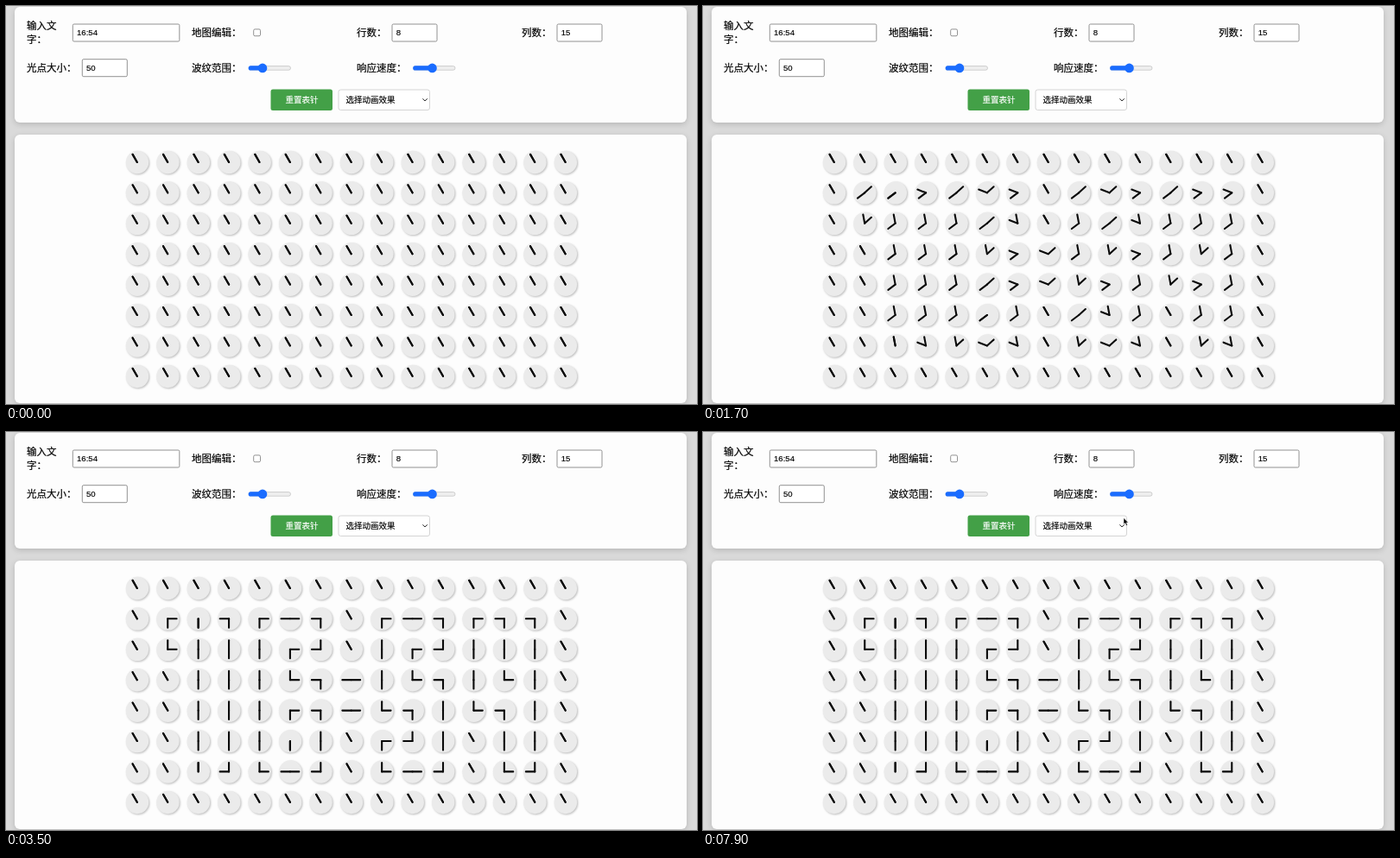
Write an HTML page that moves like this. It is 800 px wide and 461 px high and loops after 8 s.

```html
<!DOCTYPE html>
<html lang="zh-CN">
<head>
<meta charset="utf-8">
<title>表针文字</title>
<style>
html, body { margin: 0; width: 100%; height: 100%; overflow: hidden; background: #dadada; }
svg { display: block; width: 800px; height: 461px; }
text { font-family: "Noto Sans CJK SC", "Noto Sans CJK", sans-serif; font-weight: 500; fill: #000; }
.label { font-size: 11.5px; stroke: #000; stroke-width: .2; }
.small { font-size: 9.5px; stroke: #000; stroke-width: .15; }
.value { font: 9.6px "Liberation Sans", sans-serif; stroke: #000; stroke-width: .15; }
.on-button { fill: #fff; stroke: #fff; }
.panel { fill: #fdfdfd; filter: drop-shadow(0 2px 3px rgba(0, 0, 0, .16)); }
.box { fill: #fff; stroke: #767676; stroke-width: .8; }
#faces { fill: #ebebeb; filter: drop-shadow(1px 1px 1.2px rgba(0, 0, 0, .26)); }
#hands { stroke: #0a0a0a; stroke-width: 2.1; stroke-linecap: round; }
</style>
</head>
<body>
<svg viewBox="0 0 800 461">
  <rect class="panel" x="10" y="1" width="778" height="134" rx="6"/>
  <rect class="panel" x="10" y="149" width="778" height="311" rx="6"/>

  <text class="label" x="24" y="27">输入文</text>
  <text class="label" x="24" y="43">字：</text>
  <text class="label" x="215" y="35">地图编辑：</text>
  <text class="label" x="406" y="35">行数：</text>
  <text class="label" x="597" y="35">列数：</text>
  <text class="label" x="24" y="76">光点大小：</text>
  <text class="label" x="215" y="76">波纹范围：</text>
  <text class="label" x="406" y="76">响应速度：</text>

  <g id="fields"></g>
  <rect class="box" x="286.7" y="26.9" width="7.8" height="7.8" rx="1.5"/>
  <g id="sliders"></g>

  <rect x="306.5" y="96.5" width="71.5" height="24.5" rx="2.5" fill="#43a047"/>
  <text class="small on-button" x="323.5" y="112.2">重置表针</text>
  <rect x="385" y="97" width="105.5" height="23.5" rx="2.5" fill="#fff" stroke="#d4d4d4"/>
  <text class="small" x="393.5" y="112.2">选择动画效果</text>
  <path d="M482.5 107.3l2.6 2.7 2.6-2.7" fill="none" stroke="#222" stroke-width="1"/>

  <g id="faces"></g>
  <g id="hands"></g>
  <path id="cursor" d="M0 0v7.4l1.7-1.5 1.3 3 1.4-.6-1.3-2.9h2.3z" stroke="#fff" stroke-width=".5"/>
</svg>
<script>
const LOOP = 8000, STEP = 100, REST = -30;
const TURN_START = 940, TURN_TIME = 1310;
const COLS = 15, ROWS = 8, PITCH = 35.42;
const GLYPHS = [
  "",
  " ┌╷┐┌─┐ ┌─┐┌┐┐",
  " └│││┌┘ │┌┘│││",
  "  │││└┐─│└┐│└│",
  "  │││┌┐─└┐│└┐│",
  "  │││╷│ ┌┘│ ││",
  "  ╵┘└─┘ └─┘ └┘",
  ""
];
// Clockwise degrees from twelve o'clock, chosen within half a turn of REST
const UP = 0, RIGHT = 90, DOWN = -180, LEFT = -90;
const ANGLES = {
  "┌": [RIGHT, DOWN], "┐": [LEFT, DOWN], "└": [RIGHT, UP], "┘": [LEFT, UP],
  "─": [LEFT, RIGHT], "│": [UP, DOWN], "╷": [DOWN, DOWN], "╵": [UP, UP]
};
// Pointer tip: time, x, y
const POINTER = [[5000, 494, -9], [6100, 487.5, 88], [6500, 487.5, 88], [7500, 487, 99.5], [8000, 487, 99.5]];

const $ = id => document.getElementById(id);
function add(parent, tag, attrs, text) {
  const el = document.createElementNS("http://www.w3.org/2000/svg", tag);
  for (const k in attrs) el.setAttribute(k, attrs[k]);
  if (text) el.textContent = text;
  return parent.appendChild(el);
}

function addField(x, y, width, value) {
  add($("fields"), "rect", { class: "box", x, y, width, height: 20, rx: 1.5 });
  add($("fields"), "text", { class: "value", x: x + 4.7, y: y + 13.4 }, value);
}
addField(77.3, 21, 123.5, "16:54");
addField(447, 21, 52, "8");
addField(638, 21, 52, "15");
addField(88.3, 61.7, 52, "50");

function addSlider(x, thumb) {
  const g = $("sliders");
  add(g, "rect", { x, y: 69.6, width: 48.5, height: 4.6, rx: 2.3, fill: "#efefef", stroke: "#bdbdbd", "stroke-width": .7 });
  add(g, "rect", { x: x - .3, y: 69.3, width: thumb - x, height: 5.2, rx: 2.6, fill: "#1a6cff" });
  add(g, "circle", { cx: thumb, cy: 71.9, r: 5.3, fill: "#1a6cff" });
}
addSlider(281, 297);
addSlider(471.5, 493.5);

const moving = [];
for (let r = 0; r < ROWS; r++) {
  for (let c = 0; c < COLS; c++) {
    const x = 152 + c * PITCH, y = 181 + r * PITCH;
    add($("faces"), "circle", { cx: x, cy: y, r: 13.2 });
    for (const to of ANGLES[GLYPHS[r][c]] || [REST, REST]) {
      const el = add($("hands"), "line", { y2: -10.4 });
      const hand = { el, x: x - .2, y: y - .1, to };
      turn(hand, 0);
      if (to !== REST) moving.push(hand);
    }
  }
}

function turn({ el, x, y, to }, p) {
  el.setAttribute("transform", `translate(${x} ${y}) rotate(${REST + (to - REST) * p})`);
}

const clamp = v => Math.min(1, Math.max(0, v));
const easeInOut = v => v < .5 ? 2 * v * v : 1 - 2 * (1 - v) ** 2;
const easeOut = v => 1 - (1 - v) ** 2;

function placePointer(t) {
  const next = POINTER.findIndex(k => k[0] > t);
  $("cursor").style.display = next > 0 ? "" : "none";
  if (next < 1) return;
  const [t0, x0, y0] = POINTER[next - 1], [t1, x1, y1] = POINTER[next];
  const p = easeOut((t - t0) / (t1 - t0));
  $("cursor").setAttribute("transform", `translate(${x0 + (x1 - x0) * p} ${y0 + (y1 - y0) * p})`);
}

function draw(now) {
  const t = Math.floor((now % LOOP) / STEP) * STEP;
  const p = easeInOut(clamp((t - TURN_START) / TURN_TIME));
  for (const hand of moving) turn(hand, p);
  placePointer(t);
}

const begin = performance.now();
function frame() {
  draw(performance.now() - begin);
  requestAnimationFrame(frame);
}
frame();
</script>
</body>
</html>
```
